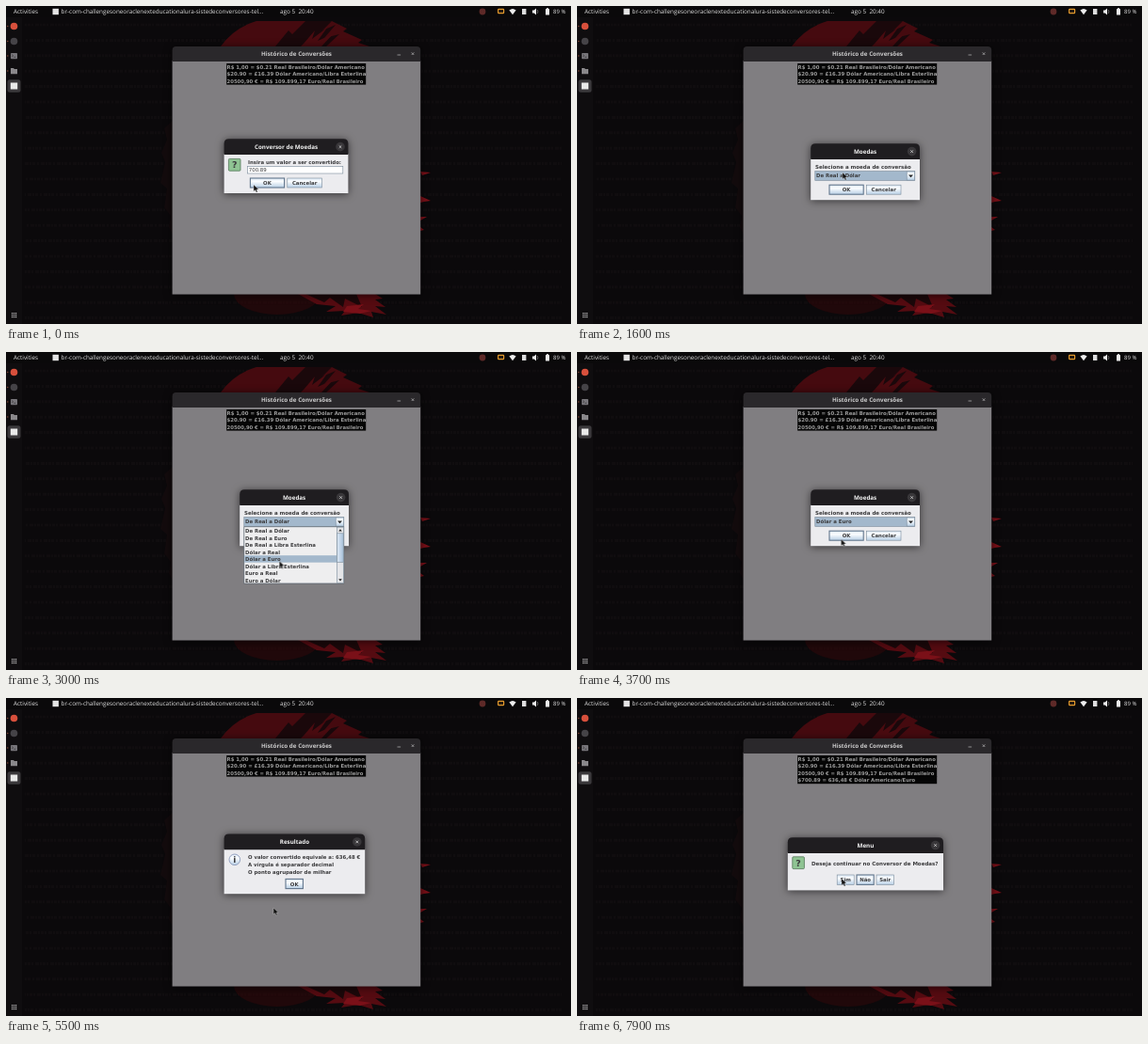
An HTML page for the animation above (8000 ms loop, 600x338 px).

```html
<!DOCTYPE html>
<html lang="pt-BR">
<head>
<meta charset="utf-8">
<title>Conversor de Moedas</title>
<style>
html, body { margin: 0; width: 100%; height: 100%; overflow: hidden; background: #0b090b; }
svg { display: block; width: 100vw; height: 100vh; }
text { font: bold 5.4px "DejaVu Sans", sans-serif; fill: #3c3c3e; text-rendering: geometricPrecision; white-space: pre; }
.bar text { font: 500 6.35px "Open Sans", sans-serif; fill: #dedede; }
text.title { font: bold 6.25px "Open Sans", sans-serif; fill: #f4f4f4; text-anchor: middle; }
text.mid { text-anchor: middle; }
text.plain { font-weight: normal; }
text.log { font-size: 5.36px; fill: #9c9c9c; }

.anim, .step { animation: 8s linear infinite; }
.step { animation-timing-function: step-end; }
.dialog { transform-box: fill-box; transform-origin: center; filter: drop-shadow(0 1px 4px #0009); }
#value { animation-name: value; }
#currency { animation-name: currency; }
#result { animation-name: result; }
#menu { animation-name: menu; }
#entry { animation-name: entry; }
#list { animation-name: list; }
#hover { animation-name: hover; }
#before { animation-name: before; }
#after { animation-name: after; }
#pointer { animation-name: pointer; }

@keyframes value {
  0%, 3.75% { opacity: 1; transform: none; }
  5%, 100% { opacity: 0; transform: scale(.85); }
}
@keyframes currency {
  0%, 6.2% { opacity: 0; transform: scale(.7); }
  7.5% { opacity: 1; transform: scale(.955); }
  8.5%, 48.75% { opacity: 1; transform: none; }
  50%, 100% { opacity: 0; transform: scale(.85); }
}
@keyframes result {
  0%, 51.8% { opacity: 0; transform: scale(.7); }
  53% { opacity: 1; transform: scale(.955); }
  54%, 86.25% { opacity: 1; transform: none; }
  87.4%, 100% { opacity: 0; transform: scale(.85); }
}
@keyframes menu {
  0%, 87.4% { opacity: 0; transform: scale(.7); }
  88.75% { opacity: 1; transform: translateY(1px) scale(.955); }
  89.9%, 100% { opacity: 1; transform: none; }
}
@keyframes entry { 0% { visibility: hidden; } 86.8%, 100% { visibility: visible; } }
@keyframes list {
  0% { visibility: hidden; }
  21.25% { visibility: visible; }
  41.25%, 100% { visibility: hidden; }
}
@keyframes before { 0% { visibility: inherit; } 41.25%, 100% { visibility: hidden; } }
@keyframes after { 0% { visibility: hidden; } 41.25%, 100% { visibility: inherit; } }
@keyframes hover {
  0% { transform: none; }
  27.7% { transform: translateY(7.5px); }
  28.4% { transform: translateY(15px); }
  29.7% { transform: translateY(22.5px); }
  31.6% { transform: translateY(30px); }
  33.6% { transform: translateY(37.5px); }
  37%, 100% { transform: translateY(30px); }
}
@keyframes pointer {
  0%, 1.2% { transform: translate(263px, 190px); }
  1.25%, 3.75% { transform: translate(277px, 188px); }
  13.75%, 15% { transform: translate(279px, 184px); }
  17.5%, 26.25% { transform: translate(282px, 177px); }
  28.75% { transform: translate(293.5px, 205px); }
  35% { transform: translate(291px, 229px); }
  38.75%, 41.25% { transform: translate(290px, 219px); }
  46.25%, 60% { transform: translate(280.5px, 199px); }
  65%, 68.75% { transform: translate(284px, 223px); }
  75%, 78.7% { transform: translate(310px, 193px); }
  78.75%, 86.25% { transform: translate(311px, 194px); }
  88.75%, 90% { transform: translate(309.5px, 199px); }
  96.25% { transform: translate(282px, 194px); }
  98.75%, 100% { transform: translate(281px, 192px); }
}
</style>
</head>
<body>
<script>
const rect = (x, y, w, h, fill, extra = '') =>
  `<rect x="${x}" y="${y}" width="${w}" height="${h}" fill="${fill}" ${extra}/>`;
const path = (d, fill, extra = '') => `<path d="${d}" fill="${fill}" ${extra}/>`;
const disc = (x, y, r, fill, extra = '') => `<circle cx="${x}" cy="${y}" r="${r}" fill="${fill}" ${extra}/>`;
const text = (x, y, s, cls = '', size = 0) =>
  `<text x="${x}" y="${y}" class="${cls}" ${size ? `style="font-size:${size}px"` : ''}>${s}</text>`;
const EDGE = 'stroke="#7a8a99" stroke-width=".6"';

function cross(x, y, color) {
  return path(`M${x - 1.3} ${y - 1.3}l2.6 2.6m0-2.6l-2.6 2.6`, 'none', `stroke="${color}" stroke-width=".7"`);
}

function button(x, y, w, h, label, focused) {
  return rect(x, y, w, h, 'url(#metal)', `stroke="${focused ? '#62768c' : '#7a8a99'}" stroke-width="${focused ? 1.1 : .6}"`)
    + text(x + w / 2, y + h / 2 + 2, label, 'mid');
}

function dialog(id, x, y, w, h, head, title, body) {
  const mid = y + head / 2, right = x + w;
  return `<g id="${id}" class="dialog anim">`
    + rect(x, y + head - 1, w, h - head + 1, '#ececef')
    + path(`M${x} ${y + head}v${5 - head}q0-5 5-5h${w - 10}q5 0 5 5v${head - 5}z`, '#1f1d20')
    + text(x + w / 2, mid + 2.2, title, 'title')
    + disc(right - 8.4, mid, 4.8, '#39373a') + cross(right - 8.4, mid, '#f0f0f0')
    + body + '</g>';
}

function question(x, y) {
  return rect(x, y, 12.6, 12.8, '#8fc493', 'rx="1" stroke="#55785a" stroke-width=".8"')
    + text(x + 6.3, y + 9.9, '?', 'mid', 9.5);
}

function wallpaper() {
  let out = rect(0, 0, 600, 338, '#0b090b');
  for (let i = 0; i < 20; i++) {
    const dashes = [2, 1, 3, 1 + i % 2, 2, 2, 4, 1].join(' ');
    out += path(`M20 ${20 + i * 16.4}H590`, 'none',
      `stroke="#100d0f" stroke-width="3" stroke-dasharray="${dashes}" stroke-dashoffset="${i * 7}"`);
  }
  return out
    // Moon above the window
    + path('M228 43Q242 23 266 16H346L362 24 358 27 378 36 374 39 386 43Z', '#450a0f')
    + path('M286 43l14-17 4 4 14-14h28l-10 10 14-6-12 14 16-4-14 13z', '#1a080b')
    + path('M316 40l12-14-3 9 16-12-10 14 16-7-12 13h-22z', '#4a0b10')
    // Loose strands at the right and shadow at the left
    + path('M440 176l11 1-9 3zM440 202l11 5-7 1-4 1zM440 224l7 0-7 4zM440 235l4 3-4 1z', '#7a1018')
    + path('M177 122l-9 8 3 12-6 14 4 10-5 22 7 6-3 20 7 9-2 12 4 8z', '#130b0d')
    // Moon below the window
    + '<ellipse cx="288" cy="306" rx="46" ry="22" fill="#3a070b" opacity=".45"/>'
    + path('M310 306H392L400 311 392 312 403 320 392 319 404 328 388 325 390 331 374 326 356 329 360 324 340 325 350 319 330 317Z', '#550b11')
    + path('M318 306l20 9 6-5 14 10 2-9 18 9-6-14z', '#1b080a')
    + path('M362 319l18-2-6 5 14 2-12 3-18-2z', '#7a1018');
}

function shell() {
  let out = rect(0, 0, 600, 12, '#0a090a') + rect(0, 12, 17, 326, '#0f0d0f');
  out += '<g class="bar">' + text(8, 8.3, 'Activities') + rect(49.5, 2.8, 6.4, 6.4, '#e4e4e4')
    + text(58.6, 8.3, 'br-com-challengesoneoraclenexteducationalura-sistedeconversores-tel...')
    + text(291, 8.3, 'ago 5\u00a0 20:40') + text(581, 8.3, '89 %', '', 6) + '</g>';
  // Status area
  out += disc(506, 6, 3.4, '#5e2a28')
    + rect(522, 2.8, 7.2, 5.4, '#e39a2d', 'rx="1.2"') + rect(523.2, 4, 4.8, 3, '#241a10')
    + path('M534.4 4.6q3.6-3 7.2 0l-3.6 4.6z', '#eee')
    + rect(548, 3, 4.4, 6, '#ddd')
    + path('M559 4.6h1.7l2.3-2v7l-2.3-2H559z', '#eee') + path('M564.2 4q1.5 2 0 4', 'none', 'stroke="#888" stroke-width=".7"')
    + rect(573, 3, 4, 6.6, '#eee', 'rx=".6"') + rect(574.2, 2, 1.6, 1, '#eee');
  // Dock
  for (const y of [21.5, 37.5, 53, 69]) out += disc(1.8, y, .7, '#8a4a38');
  out += disc(8.5, 21.5, 3.8, '#d8503c') + disc(8.5, 37.5, 3.8, '#454347')
    + rect(5, 50, 7, 6.2, '#77757a', 'rx=".8"') + path('M6.2 51.6l1.3 1.2-1.3 1.2M8.3 54.3h2', 'none', 'stroke="#222" stroke-width=".6"')
    + path('M5 66h3l.8 1H12v5.2H5z', '#8a888b')
    + rect(1.5, 78.2, 14, 13.6, '#3a383b', 'rx="2.5"') + rect(4.8, 81.5, 7.4, 7, '#e9e9e9');
  for (let i = 0; i < 9; i++) out += rect(6 + i % 3 * 2, 326 + Math.floor(i / 3) * 2, 1.2, 1.2, '#c8c8c8');
  return out;
}

function history() {
  return '<g style="filter:drop-shadow(0 1px 4px #000a)">' + rect(176.6, 58, 263.6, 248.5, '#807e81')
    + path('M176.6 59v-12q0-4 4-4h255.6q4 0 4 4v12z', '#2a282b') + '</g>'
    + '<g opacity=".8">' + text(308.5, 53.3, 'Histórico de Conversões', 'title') + '</g>'
    + path('M415.5 52h3.6', 'none', 'stroke="#bbb" stroke-width=".7"') + cross(432, 50.7, '#bbb')
    + rect(234.2, 61, 148, 22.6, '#050505')
    + text(234.6, 67, 'R$ 1,00 = $0.21 Real Brasileiro/Dólar Americano', 'log')
    + text(234.6, 74.4, '$20.90 = £16.39 Dólar Americano/Libra Esterlina', 'log')
    + text(234.6, 81.9, '20500,90 € = R$ 109.899,17 Euro/Real Brasileiro', 'log', 5.28)
    + '<g id="entry" class="step">' + rect(234.2, 83, 148, 8.2, '#050505')
    + text(234.6, 89.3, '$700.89 = 636,48 € Dólar Americano/Euro', 'log', 5.28) + '</g>';
}

function dropdown() {
  const items = ['De Real a Dólar', 'De Real a Euro', 'De Real a Libra Esterlina', 'Dólar a Real',
    'Dólar a Euro', 'Dólar a Libra Esterlina', 'Euro a Real', 'Euro a Dólar'];
  return '<g id="list" class="step">' + rect(252.8, 185.8, 106, 60.2, '#eeeeef', 'stroke="#55606c" stroke-width=".7"')
    + `<g id="hover" class="step">${rect(253.2, 186.2, 98, 7.5, '#a3b8cc')}</g>`
    + items.map((s, i) => text(254, 192 + i * 7.5, s)).join('')
    + rect(351.3, 186.2, 7.2, 59.4, '#e4e5e8', EDGE)
    + rect(351.6, 192.8, 6.6, 30.5, 'url(#thumb)', EDGE)
    + path('M353.2 190.6h3.6l-1.8-2.4zM353.2 241.2h3.6l-1.8 2.4z', '#222') + '</g>';
}

const valueBody = question(236.4, 162.4)
  + text(257, 167.7, 'Insira um valor a ser convertido:', '', 5.38)
  + rect(256.6, 170.4, 101.2, 7.6, '#fff', EDGE) + text(257.8, 176.2, '700.89', 'plain')
  + button(259.4, 183, 36.2, 10, 'OK', true) + button(298.8, 183, 36.6, 10, 'Cancelar');

const currencyBody = text(253, 172.5, 'Selecione a moeda de conversão', '', 5.52)
  + rect(252.8, 175.6, 106, 9.8, '#a3b8cc', EDGE)
  + `<g id="before" class="step">${text(254, 182.4, 'De Real a Dólar')}</g>`
  + `<g id="after" class="step">${text(254, 182.4, 'Dólar a Euro')}</g>`
  + rect(350.2, 175.9, 8.4, 9.2, 'url(#metal)', EDGE) + path('M352 179.4h5l-2.5 2.8z', '#222')
  + button(268, 190.2, 36.2, 10, 'OK', true) + button(307.4, 190.2, 36.6, 10, 'Cancelar');

const resultBody = disc(242.8, 171.8, 5.8, 'url(#metal)', 'stroke="#8090b4" stroke-width=".8"')
  + text(242.8, 175, 'i', 'mid', 9)
  + text(257, 170.9, 'O valor convertido equivale a: 636,48 €', '', 5.36)
  + text(257, 178.9, 'A vírgula é separador decimal') + text(257, 186.7, 'O ponto agrupador de milhar')
  + button(297, 192.4, 18.4, 10.2, 'OK', true);

const menuBody = question(228.8, 168.8)
  + text(249, 178.2, 'Deseja continuar no Conversor de Moedas?', '', 5.53)
  + button(276.2, 188, 18, 10.4, 'Sim') + button(297, 188, 18.2, 10.4, 'Não', true)
  + button(318, 188, 18.4, 10.4, 'Sair');

document.body.innerHTML = `<svg viewBox="0 0 600 338" preserveAspectRatio="none">
  <defs>
    <linearGradient id="metal" x2="0" y2="1"><stop stop-color="#dce8f4"/><stop offset=".35" stop-color="#fbfdff"/><stop offset="1" stop-color="#b8cfe5"/></linearGradient>
    <linearGradient id="thumb"><stop stop-color="#dce8f4"/><stop offset="1" stop-color="#a9c2db"/></linearGradient>
  </defs>`
  + wallpaper() + shell() + history()
  + dialog('value', 231.6, 141.3, 131.8, 57.7, 16.7, 'Conversor de Moedas', valueBody)
  + dialog('currency', 248.2, 146.3, 115.8, 59.9, 16.6, 'Moedas', currencyBody)
  + dropdown()
  + dialog('result', 231.6, 144.6, 149.6, 63.6, 16.7, 'Resultado', resultBody)
  + dialog('menu', 223.8, 148.2, 165.2, 56.2, 16.7, 'Menu', menuBody)
  + '<g id="pointer" class="anim">'
  + path('M0 0V7L1.7 5.6 2.8 8.1 4.1 7.5 3 5.1H5.2Z', '#111', 'stroke="#ddd" stroke-width=".35"')
  + '</g></svg>';
</script>
</body>
</html>
```
